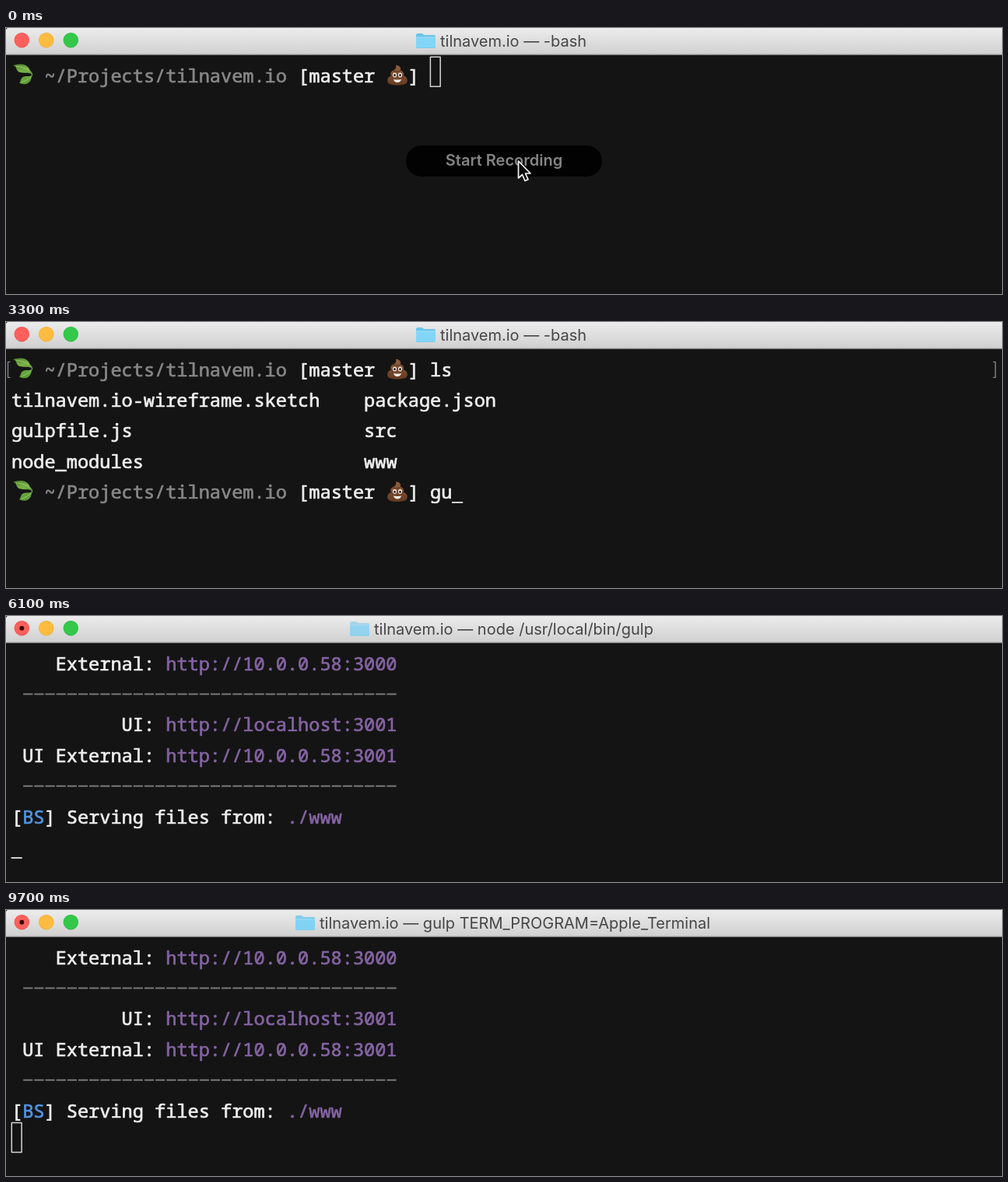
Animation, 1280 px wide and 342 px high, one loop 9.8 s. Source, as an HTML page with a canvas:

```html
<!DOCTYPE html>
<html lang="en">
<head>
<meta charset="utf-8">
<title>Terminal session</title>
<style>
  html, body { margin: 0; width: 100%; height: 100%; overflow: hidden; background: #141414; }
  canvas { display: block; width: 1280px; height: 342px; }
</style>
</head>
<body>
<canvas id="stage" width="1280" height="342"></canvas>
<script>
const ctx = document.getElementById('stage').getContext('2d');

const LOOP = 9800, STEP = 100;
const LEFT = 7, CELL = 14.16, TOP = 36.4, LINE = 39.4, BASE = 33.2;
const MONO = '500 23.6px "Noto Sans Mono", monospace';
const SANS = '20px Inter, sans-serif';
const SITE = 'tilnavem.io';
const WHITE = '#efefef', GREY = '#878787', PURPLE = '#8463a2', BLUE = '#5294e2';

const T = {
  focus: 600, list: 1600, run: 4700, output: 5900, blur: 7600, retitle: 8100,
  ls: [1200, 1300],
  gulp: [3100, 3200, 3400, 3600]
};

const colX = col => LEFT + col * CELL;
const rowY = row => TOP + row * LINE;
const typed = (word, times, t) => word.slice(0, times.filter(k => k <= t).length);

function rect(x, y, w, h, color) {
  ctx.fillStyle = color;
  ctx.fillRect(x, y, w, h);
}

function disc(x, y, rx, ry, color) {
  ctx.fillStyle = color;
  ctx.beginPath();
  ctx.ellipse(x, y, rx, ry, 0, 0, Math.PI * 2);
  ctx.fill();
}

function shape(d, fill, stroke, width = 1) {
  const path = new Path2D(d);
  if (fill) { ctx.fillStyle = fill; ctx.fill(path); }
  if (stroke) { ctx.strokeStyle = stroke; ctx.lineWidth = width; ctx.stroke(path); }
}

function at(x, y, draw) {
  ctx.save();
  ctx.translate(x, y);
  draw();
  ctx.restore();
}

// A thin outline gives the medium weight of the terminal type.
function write(col, row, text, color = WHITE) {
  const x = colX(col), y = rowY(row) + BASE;
  ctx.font = MONO;
  ctx.fillStyle = ctx.strokeStyle = color;
  ctx.lineWidth = 0.7;
  ctx.lineJoin = 'round';
  ctx.fillText(text, x, y);
  ctx.strokeText(text, x, y);
}

function leaves() {
  const green = ctx.createLinearGradient(0, 0, 8, 27);
  green.addColorStop(0, '#477f2a');
  green.addColorStop(0.4, '#78b045');
  green.addColorStop(1, '#5b9c35');
  shape('M1 2 C8 -1 18 -1 22 6 C23 9 24 11 25 13 C20 10 17 12 13 11 C8 11 6 8 5 5 C4 3 3 2 1 2Z', green);
  shape('M5 3 Q15 3 22 9', null, '#a9d07a', 0.8);
  shape('M22 8 Q26 11 25.5 15', null, '#6ba33f', 1.3);
  shape('M9 24 C11 23 10 20 13 17 C17 14 21 17 26 14 C24 17 25 20 22 23 C18 27 13 26 9 24Z', green);
  shape('M12 23.5 Q18 22 24 16.5', null, '#a9d07a', 0.8);
}

function poop() {
  const brown = ctx.createLinearGradient(0, 0, 0, 26);
  brown.addColorStop(0, '#94613f');
  brown.addColorStop(1, '#653a22');
  shape('M11 0 C16 1 18 4 17 7 C21 8 22 12 21 14 C25 15 27 19 25 23 C23 27 3 27 1 23 ' +
    'C-1 19 1 15 5 14 C3 11 5 8 8 7 C11 5 12 3 11 0Z', brown);
  shape('M8 8 Q14 10 17 7 M5 15 Q6 16 8 16 M18 16 Q20 16 21 14', null, '#59331f');
  for (const x of [9.5, 16.5]) {
    disc(x, 13, 2.5, 3, '#f4f0ed');
    disc(x, 13.3, 1.3, 1.6, '#24150e');
  }
  shape('M8 18.5 Q13 19.5 18 18.5 Q17 22.5 13 22.5 Q9 22.5 8 18.5Z', '#f4f0ed');
}

function prompt(row, command) {
  at(8, rowY(row) + 10, leaves);
  write(3, row, '~/Projects/' + SITE, GREY);
  write(26, row, '[master');
  at(490, rowY(row) + 11, poop);
  write(36, row, ']');
  write(38, row, command);
}

function lineMarks(row) {
  const y = rowY(row) + 15;
  shape(`M5.5 ${y} H2.5 V${y + 20} H5.5 M1268.5 ${y} H1271.5 V${y + 20} H1268.5`, null, '#858585', 1.4);
}

function cursor(col, row, t, since, hollow) {
  const x = colX(col) - 0.4, y = rowY(row);
  if (hollow) {
    ctx.strokeStyle = '#d5d5d5';
    ctx.lineWidth = 1.5;
    ctx.strokeRect(x + 0.7, y + 0.8, 12.8, 38);
  } else if ((t - since) % 1000 < 500) {
    rect(x, Math.round(y + 37.2), CELL, 2, '#d0d0d0');
  }
}

function folder(x, alpha) {
  at(x, 6, () => {
    ctx.globalAlpha = alpha;
    shape('M0 3 Q0 1 2 1 H8 L10 3 H23 Q25 3 25 5 V18 Q25 20 23 20 H2 Q0 20 0 18Z', '#6cc4ea');
    shape('M0 6 H25 V18 Q25 19.5 23 19.5 H2 Q0 19.5 0 18Z', '#82d5f7');
    rect(0, 5.5, 25, 1, '#a4e3fb');
  });
}

function titleBar(t) {
  const shade = ctx.createLinearGradient(0, 0, 0, 34);
  shade.addColorStop(0, '#ececec');
  shade.addColorStop(1, '#d0d0d0');
  ctx.fillStyle = shade;
  ctx.beginPath();
  ctx.roundRect(0, 0, 1280, 34, [3, 0, 0, 0]);
  ctx.fill();
  rect(0, 33, 1280, 1, '#bababa');
  rect(0, 34, 1280, 1, '#7c7c7c');

  const lights = [['#fc605c', '#ec544f'], ['#fdbc40', '#ecae31'], ['#34c84a', '#28ba3b']];
  lights.forEach(([fill, edge], i) => {
    const x = 20.3 + i * 31.5;
    disc(x, 15.7, 9.7, 9.7, edge);
    disc(x, 15.7, 9, 9, fill);
  });

  const running = t >= T.run;
  if (running) disc(20.3, 15.7, 3, 3, '#3d0505');

  let x = 558, task = '-bash', alpha = 1;
  if (t >= T.retitle) {
    [x, task, alpha] = [403, 'gulp TERM_PROGRAM=Apple_Terminal', 0.8];
  } else if (running) {
    [x, task, alpha] = [473, 'node /usr/local/bin/gulp', 0.5];
  }
  folder(x - 31, alpha);
  ctx.font = SANS;
  ctx.fillStyle = '#464646';
  ctx.fillText(`${SITE} — ${task}`, x, 23.5);
}

function recordButton(t) {
  const alpha = Math.max(0, 1 - t / 300);
  if (!alpha) return;
  ctx.save();
  ctx.globalAlpha = alpha;
  ctx.fillStyle = '#020202';
  ctx.beginPath();
  ctx.roundRect(514, 151, 252, 40, 20);
  ctx.fill();
  ctx.font = '600 ' + SANS;
  ctx.textAlign = 'center';
  ctx.fillStyle = '#858585';
  ctx.fillText('Start Recording', 640, 177);
  ctx.restore();
  at(658, 170, () =>
    shape('M0.5 1 V23 L5.5 18.5 L9 26.5 L13 24.8 L9.5 17 H16Z', '#0b0b0b', '#f4f4f4', 1.7));
}

function shell(t) {
  const ls = typed('ls', T.ls, t);
  prompt(0, ls);
  if (t < T.list) {
    const since = Math.max(T.focus, ...T.ls.filter(k => k <= t));
    cursor(38 + ls.length, 0, t, since, t < T.focus);
    return;
  }

  lineMarks(0);
  const files = [[SITE + '-wireframe.sketch', 'package.json'], ['gulpfile.js', 'src'], ['node_modules', 'www']];
  files.forEach(([a, b], i) => {
    write(0, i + 1, a);
    write(32, i + 1, b);
  });

  const gulp = typed('gulp', T.gulp, t);
  prompt(4, gulp);
  if (t >= T.run) {
    lineMarks(4);
    cursor(0, 5, t, T.run);
  } else {
    cursor(38 + gulp.length, 4, t, Math.max(T.list, ...T.gulp.filter(k => k <= t)));
  }
}

function divider(row) {
  for (let col = 1; col < 35; col++) rect(colX(col) + 1, rowY(row) + 23.7, 12.2, 1.9, '#7d7d7d');
}

function server(t) {
  const link = (row, col, label, url) => {
    write(col, row, label);
    write(14, row, url, PURPLE);
  };
  link(0, 4, 'External:', 'http://10.0.0.58:3000');
  divider(1);
  link(2, 10, 'UI:', 'http://localhost:3001');
  link(3, 1, 'UI External:', 'http://10.0.0.58:3001');
  divider(4);
  write(0, 5, '[');
  write(1, 5, 'BS', BLUE);
  write(3, 5, '] Serving files from:');
  write(25, 5, './www', PURPLE);
  cursor(0, 6, t, T.output, t >= T.blur);
}

let start;
function frame(now) {
  start ??= now;
  const t = Math.floor((now - start) % LOOP / STEP) * STEP;
  rect(0, 0, 1280, 342, '#141414');
  titleBar(t);
  (t < T.output ? shell : server)(t);
  recordButton(t);
  requestAnimationFrame(frame);
}
requestAnimationFrame(frame);
</script>
</body>
</html>
```
